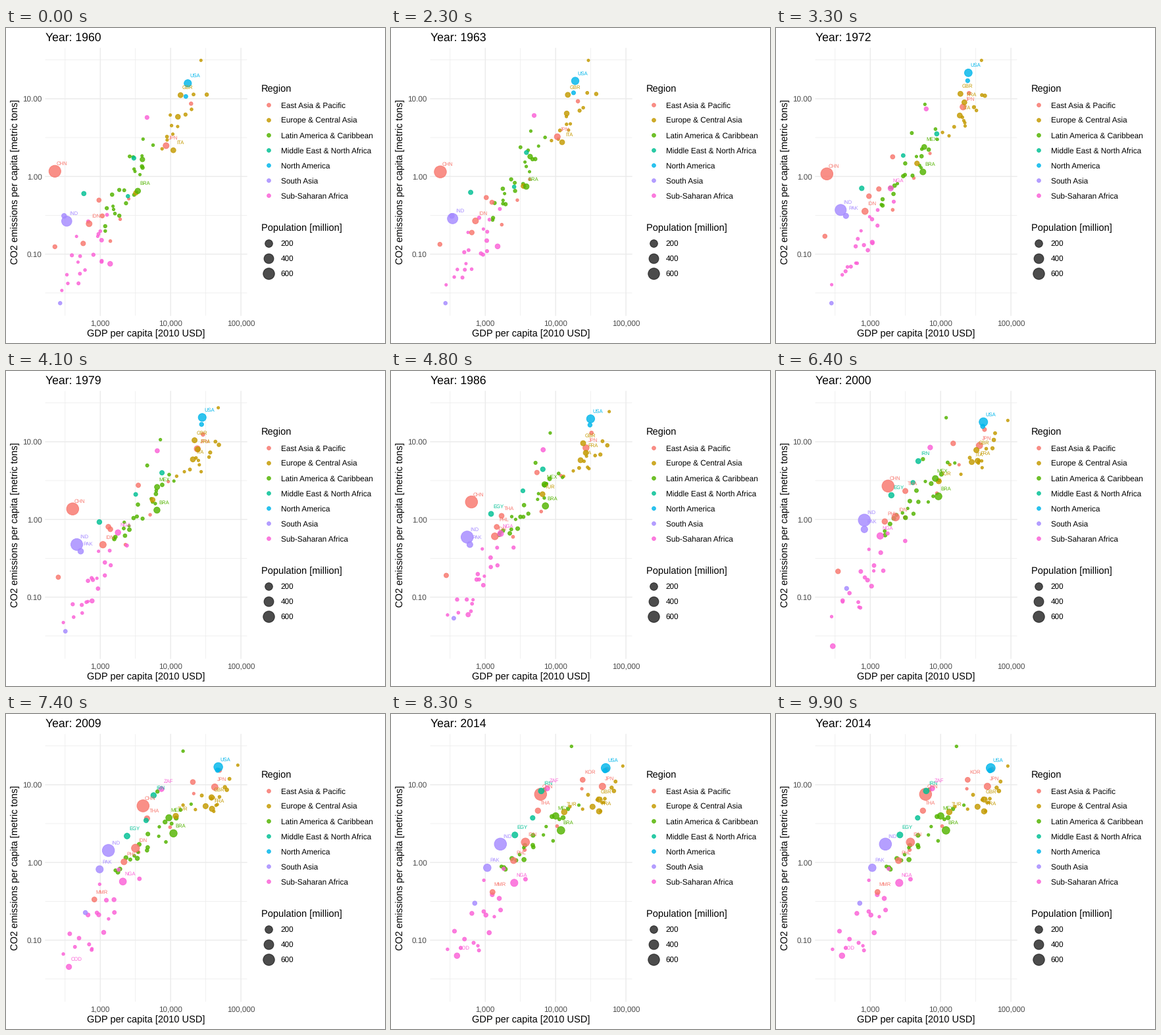
A matplotlib script that plays this animation: 576 by 480 pixels, repeating every 10000 ms.

```python
import numpy as np
import matplotlib.pyplot as plt
from matplotlib.animation import FuncAnimation
from matplotlib.colors import to_rgba

W, H, DPI = 576, 480, 96
FRAMES, PAUSE, LAST_STEP = 100, 20, 59
YEAR0, YEAR1 = 1960, 2014
KNOTS = {3: (0, 13, 59), 4: (0, 13, 44, 59)}  # steps of a path's key points
LABEL_POP = 50  # million people needed for a label
EDGE = 0.71

plt.rcParams.update({"font.family": "Liberation Sans", "text.hinting": "none"})

REGIONS = {
    "East Asia & Pacific": "#F8766D",
    "Europe & Central Asia": "#C49A00",
    "Latin America & Caribbean": "#53B400",
    "Middle East & North Africa": "#00C094",
    "North America": "#00B6EB",
    "South Asia": "#A58AFF",
    "Sub-Saharan Africa": "#FB61D7",
}
EAP, ECA, LAC, MENA, NAM, SAS, SSA = REGIONS.values()

rng = np.random.default_rng(7)
steps = np.arange(LAST_STEP + 1)
time = steps / LAST_STEP

fig = plt.figure(figsize=(W / DPI, H / DPI), dpi=DPI, facecolor="white")
ax = fig.add_axes([0, 0, 1, 1])
ax.set(xlim=(0, W), ylim=(H, 0))
ax.axis("off")


def text(x, y, s, size, color="black", ha="left", **kw):
    return ax.text(x, y, s, fontsize=size, color=color, ha=ha, va="baseline", **kw)


def radius(pop):
    return 2.3 + 0.28 * np.sqrt(np.minimum(pop, 700))


def area(r):
    """Marker area for a visible radius in pixels, outline included."""
    return (1.5 * (np.asarray(r) - 0.45)) ** 2


def circles(x, y, r, colors, alpha=0.82):
    rgba = [to_rgba(c, alpha) for c in colors]
    return ax.scatter(x, y, s=area(r), facecolors=rgba, edgecolors=rgba,
                      linewidths=EDGE, zorder=3)


def vline(x, lw):
    ax.plot([x, x], [31, 438], color="#EBEBEB", lw=lw, snap=False)


def hline(y, lw):
    ax.plot([60, 366], [y, y], color="#EBEBEB", lw=lw, snap=False)


# Logarithmic grid: one decade is 107 px wide and 118.4 px high
for i in range(3):
    x, y = 143.3 + 106.9 * i, 344.6 - 118.4 * i
    vline(x - 53.5, 0.53)
    vline(x, 1.07)
    hline(y, 1.07)
    text(x, 453.5, f"{10 ** (3 + i):,}", 8.8, "#4D4D4D", "center")
    text(54.5, y + 4.2, f"{10.0 ** (i - 1):.2f}", 8.8, "#4D4D4D", "right")
for i in range(4):
    hline(403.8 - 118.4 * i, 0.53)

text(213, 470, "GDP per capita [2010 USD]", 11, ha="center")
text(18, 234.5, "CO2 emissions per capita [metric tons]", 11, ha="center",
     rotation=90, rotation_mode="anchor")
title = text(60, 20.3, "", 13.2)

# Legends
text(387.5, 96.5, "Region", 11)
for i, (name, color) in enumerate(REGIONS.items()):
    y = 117.3 + 23 * i
    circles([399.3], [y], 3.3, [color])
    text(417.7, y + 4.1, name, 8.8)
text(387.5, 308.5, "Population [million]", 11)
for i, pop in enumerate((200, 400, 600)):
    y = 327.5 + 23 * i
    circles([399.3], [y], radius(pop), ["black"], alpha=0.7)
    text(417.7, y + 4.1, str(pop), 8.8)

tracks, pops, colors, codes = [], [], [], []


def add(color, track, pop0, pop1, code=""):
    tracks.append(np.clip(track, (74.3, 49.3), (352.3, 419.3)))
    pops.append(pop0 * (pop1 / pop0) ** time)
    colors.append(color)
    codes.append(code)


def country(code, color, pop0, pop1, *points):
    """A country that moves evenly from one key point to the next."""
    knots = KNOTS[len(points)]
    track = [np.interp(steps, knots, axis) for axis in zip(*points)]
    add(color, np.transpose(track) + 0.3, pop0, pop1, code)


def cloud(color, n, biggest, growth, spread, start, end):
    """Small countries strewn along a band that drifts from start to end."""
    ease = np.sqrt(time)[:, None]
    for u in (np.arange(n) + 0.5) / n:
        a, b = (np.array(band[0]) * (1 - u) + np.array(band[1]) * u
                + rng.normal(0, spread, 2) for band in (start, end))
        phase, rate = rng.uniform(0, 2 * np.pi, 2), rng.uniform(1, 2)
        wobble = np.sin(2 * np.pi * rate * time[:, None] + phase) * (2, 6)
        pop = biggest * rng.random() ** 2 + 0.3
        add(color, a + (b - a) * ease + wobble, pop, pop * growth)


cloud(EAP, 3, 3, 2.5, 5, ((148, 345), (200, 240)), ((178, 238), (326, 104)))
cloud(ECA, 11, 12, 1.3, 8, ((235, 190), (288, 105)), ((288, 147), (345, 108)))
cloud(LAC, 21, 12, 2.5, 11, ((145, 312), (225, 178)), ((168, 238), (270, 140)))
cloud(SSA, 18, 8, 3.5, 13, ((84, 408), (160, 295)), ((97, 370), (172, 255)))

country("", EAP, 10, 23, (281, 115), (293, 99), (328, 84))
country("CHN", EAP, 667, 1364, (74, 218), (77, 222), (170, 175), (227, 122))
country("IDN", EAP, 88, 255, (126, 298), (135, 279), (204, 195))
country("JPN", EAP, 92, 127, (243, 179), (284, 120), (321, 110))
country("KOR", EAP, 25, 50.4, (146, 286), (177, 196), (269, 110), (291, 100))
country("MMR", EAP, 22, 54, (74, 333), (74, 317), (94, 305), (154, 271))
country("PHL", EAP, 27, 100, (141, 262), (156, 245), (165, 229), (186, 223))
country("THA", EAP, 38, 68, (117, 328), (141, 256), (223, 147))
country("", ECA, 0.3, 0.6, (296, 49), (312, 49), (352, 75), (352, 79))
country("FRA", ECA, 47, 66, (261, 135), (286, 113), (316, 148))
country("GBR", ECA, 52, 65, (265, 102), (280, 100), (316, 130))
country("ITA", ECA, 50.2, 60, (254, 186), (279, 133), (306, 141))
country("TUR", ECA, 34, 77, (197, 251), (214, 206), (263, 149))
country("BRA", LAC, 72, 204, (200, 248), (223, 219), (258, 177))
country("MEX", LAC, 39, 124, (207, 200), (225, 181), (250, 155))
country("", LAC, 0.9, 1.4, (208, 169), (226, 116), (274, 49))
country("", MENA, 11, 39, (185, 256), (193, 194), (215, 158))
country("EGY", MENA, 30, 91, (118, 252), (130, 244), (175, 189), (188, 184))
country("IRN", MENA, 22, 78, (194, 198), (244, 161), (216, 137), (228, 117))
country("", NAM, 18, 35, (273, 104), (291, 80), (325, 86))
country("USA", NAM, 181, 319, (276, 84), (292, 68), (326, 82))
country("IND", SAS, 450, 1295, (92, 294), (98, 277), (134, 227), (166, 198))
country("", SAS, 10, 28, (82, 419), (84, 419), (107, 331), (127, 288))
country("PAK", SAS, 45, 195, (88, 286), (106, 286), (134, 241), (146, 234))
country("COD", SSA, 15, 74, (145, 323), (146, 326), (86, 419), (100, 368))
country("NGA", SSA, 45, 176, (158, 359), (174, 244), (158, 251), (187, 257))
country("ZAF", SSA, 18, 55, (214, 136), (228, 123), (237, 113))

tracks = np.stack(tracks, axis=1)
pops = np.stack(pops, axis=1)
dots = circles(*tracks[0].T, radius(pops[0]), colors)
labels = [(i, text(0, 0, code, 5.69, colors[i], "center", zorder=4))
          for i, code in enumerate(codes) if code]


def update(frame):
    step = min(max(frame - PAUSE, 0), LAST_STEP)
    title.set_text(f"Year: {round(YEAR0 + (YEAR1 - YEAR0) * time[step])}")
    dots.set_offsets(tracks[step])
    dots.set_sizes(area(radius(pops[step])))
    for i, label in labels:
        label.set_position(tracks[step, i] + (11, -9))
        label.set_visible(pops[step, i] >= LABEL_POP)
    return [title, dots] + [label for _, label in labels]


anim = FuncAnimation(fig, update, frames=FRAMES, interval=100,
                     init_func=lambda: update(0), repeat=True, repeat_delay=0)
plt.show()
```
